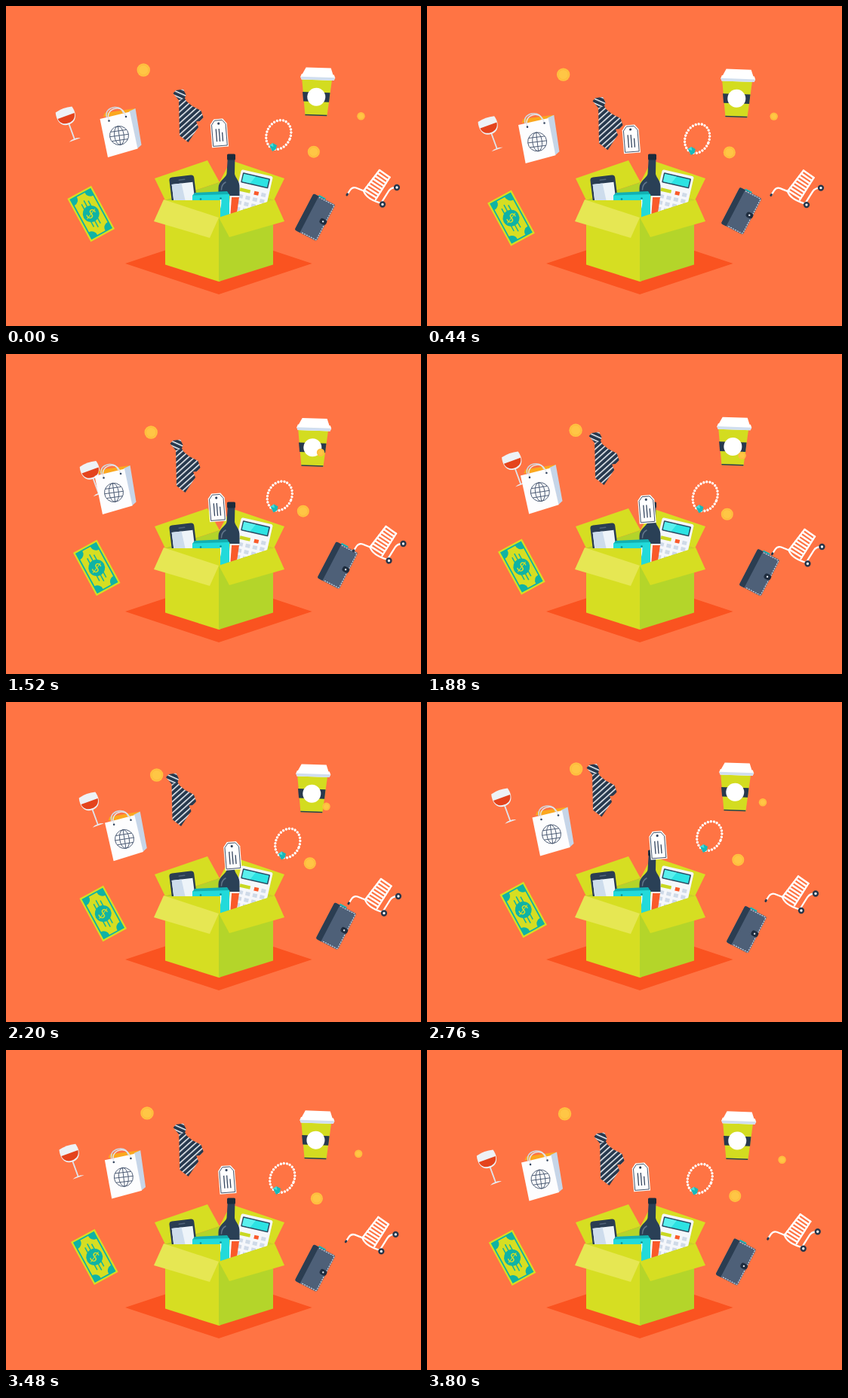
An HTML page that plays this animation: 550 px wide and 425 px high, repeating every 3.84 s.

```html
<!DOCTYPE html>
<html lang="en">
<head>
<meta charset="utf-8">
<title>Box of goods</title>
<style>
html, body { margin: 0; width: 100%; height: 100%; overflow: hidden; background: #ff7444; }
svg { display: block; width: 550px; height: 425px; }
</style>
</head>
<body>
<svg viewBox="0 0 550 425" xmlns="http://www.w3.org/2000/svg">
  <defs>
    <pattern id="stripes" width="5.6" height="5.6" patternUnits="userSpaceOnUse" patternTransform="rotate(-42)">
      <rect width="5.6" height="5.6" fill="#27394e"/>
      <rect width="5.6" height="1.5" fill="#f3f6fa"/>
    </pattern>
    <pattern id="knotStripes" href="#stripes" patternTransform="rotate(24)"/>
  </defs>

  <rect width="550" height="425" fill="#ff7444"/>
  <path d="M158 342L282 301 405.500 342 282 383Z" fill="#fa5320"/>

  <!-- back of the box -->
  <path d="M197 229L267 205 283 234 211 258Z" fill="#d6de22"/>
  <path d="M298 205L369 229 355 258 283 234Z" fill="#d6de22"/>
  <path d="M211 258L283 234V282Z" fill="#b3d42a"/>
  <path d="M283 234L355 258 283 282Z" fill="#c5da26"/>

  <!-- contents -->
  <g transform="translate(216 228) rotate(-7)">
    <rect width="33" height="56" rx="4" fill="#2a3d52"/>
    <rect x="2.5" y="9.5" width="28" height="42" fill="#eef4f9"/>
    <path d="M2.5 9.5h13l4 42H2.5Z" fill="#cddcec"/>
    <rect x="12" y="4" width="9" height="1.500" rx=".7" fill="#52647a"/>
  </g>
  <g transform="translate(312 217) rotate(13)">
    <rect width="43" height="62" rx="2.5" fill="#f5f7fb"/>
    <rect x="3" y="3.5" width="37" height="13.5" rx="1" fill="#2a4a60"/>
    <rect x="4.500" y="5" width="34" height="10.5" fill="#2ce3e3"/>
    <path d="M4.500 5h16l-5 10.500H4.500Z" fill="#5af0ee"/>
    <rect x="4" y="24" width="14" height="4.5" fill="#c9d822"/>
    <g id="keys"></g>
  </g>
  <path d="M297 252L309 252 305 282H294Z" fill="#f7f9fb"/>
  <path d="M299 254H309L305 282H297Z" fill="#fa5a2a"/>
  <g fill="#2a4056">
    <path d="M294 198H303.500L303 223C304 229 310 231 309.500 242V252H281.500V242C281.500 232 291 229 292.500 223Z"/>
    <rect x="293" y="196.500" width="11" height="8" rx="1.500" fill="#1b2b3c"/>
    <path d="M285.500 244Q285.500 237 291 234" fill="none" stroke="#61758a" stroke-width="1.500" stroke-linecap="round"/>
  </g>
  <path d="M250 248L293 246 297 252H247Z" fill="#12b0b2"/>
  <path d="M247 251.500L296 250V284H247Z" fill="#22dada"/>
  <path d="M258 258C257 270 263 277 272 278S285 269 284.500 257" fill="none" stroke="#f4fbfb" stroke-width="1.700"/>
  <circle cx="258" cy="256.500" r="1.300" fill="#0d8d92"/>
  <circle cx="284.500" cy="255.500" r="1.300" fill="#0d8d92"/>

  <!-- front of the box -->
  <path d="M211 258H284V365.500L282 366 211 343.500Z" fill="#d6de22"/>
  <path d="M282 281L354 258V343.500L282 366Z" fill="#b4d52a"/>
  <path d="M209 257L282 281 270 308 196 286Z" fill="#e6e753"/>
  <path d="M356 257L282 281 296 307 369 286Z" fill="#d6de22"/>

  <!-- floating goods, drawn where they stand at time zero -->
  <g id="glass"><g transform="translate(76.500 137.500) rotate(-20)">
    <path d="M0 19V42" stroke="#dfe5ec" stroke-width="1.800"/>
    <path d="M-8 43Q0 39.500 8 43Z" fill="#e9edf2"/>
    <path d="M-11.500 0Q0-3 11.500 0C14.500 11 11 21 0 21S-14.500 11-11.500 0Z" fill="#eef2f6"/>
    <path d="M-11.700 9H11.700C11 15 7 19 0 19S-11 15-11.700 9Z" fill="#e4441d"/>
  </g></g>

  <g id="bag">
    <path d="M129 147L131 142 171 136 168 146Z" fill="#fba81f"/>
    <path d="M163 140L171.500 136 179.500 184.500 174 189.500Z" fill="#c6d5e8"/>
    <path d="M124.500 150L164 140.500 174.500 189.500 135 201Z" fill="#fdfdfe"/>
    <path d="M133.500 148C131 139 138 135 144 134.500S154 137 155.500 142" fill="none" stroke="#cfd5de" stroke-width="1.600"/>
    <path d="M136.500 152C133 142 139 137 146 136S157 140 159 147" fill="none" stroke="#e3e6ec" stroke-width="1.500"/>
    <circle cx="136.500" cy="152.500" r="1.300" fill="#35465f"/>
    <circle cx="159" cy="147" r="1.300" fill="#35465f"/>
    <g transform="translate(150 172) rotate(-8)" fill="none" stroke="#46556f" stroke-width=".9">
      <circle r="12.500"/><ellipse rx="6.300" ry="12.500"/>
      <path d="M0-12.500V12.500M-12.500 0H12.500M-10.800-6.200H10.800M-10.800 6.200H10.800"/>
    </g>
  </g>

  <g id="bill"><g transform="translate(112.700 276) rotate(-28.500)">
    <rect x="-18" y="-32.500" width="36" height="65" fill="#d6de22"/>
    <rect x="-15.800" y="-30.300" width="31.600" height="60.600" fill="#0fb3a5"/>
    <path d="M-6-28.500H6A8 8 0 0 0 14-20V20A8 8 0 0 0 6 28.500H-6A8 8 0 0 0-14 20V-20A8 8 0 0 0-6-28.500Z" fill="#d6de22"/>
    <path d="M-5-17V17M0-20V20M5-17V17" stroke="#0fb3a5" stroke-width="1.500"/>
    <circle r="11" fill="#0fb3a5"/>
    <text transform="rotate(62)" y="6.300" text-anchor="middle" font-family="Lato, sans-serif" font-size="18" fill="#d6de22">$</text>
  </g></g>

  <g id="tie" fill="url(#stripes)">
    <path d="M236 124L247 133 258.500 139 261.500 148 257 153 247 154Z"/>
    <path d="M229 124L236.500 121.500 248 143 255 161 241.500 181 230 172Z"/>
    <path d="M221.500 116L225 112 235 110.500 238.500 118 237 122.500 229 125Z" fill="url(#knotStripes)"/>
  </g>

  <g id="tag"><g transform="translate(282.700 169) rotate(-4.500)">
    <path d="M-6-19H6L11-12.500V18.500H-11V-12.500Z" fill="#fff"/>
    <path d="M-5-17.200H5L9.300-11.700V16.700H-9.300V-11.700Z" fill="none" stroke="#35465f" stroke-width=".9"/>
    <circle cy="-13" r="1.600" fill="#35465f"/>
    <path d="M-4-6V11M0-6V11M4-1V11" stroke="#35465f" stroke-width="1.300"/>
  </g></g>

  <g id="beads">
    <ellipse rx="15.800" ry="20" transform="translate(361.300 171) rotate(24)" fill="none" stroke="#fff" stroke-width="3.400" stroke-linecap="round" stroke-dasharray="0 4.100"/>
    <path d="M349 185L353.500 182 359 185 357.500 190.500 353 193Z" fill="#16b9ba"/>
    <path d="M349 185L353.500 182 354.500 187Z" fill="#4fdcda"/>
  </g>

  <g id="cup"><g transform="translate(411.300 120.700) rotate(2)">
    <path d="M-20-24H20L15 25H-14Z" fill="#d3dc20"/>
    <path d="M-18.500-6H18L17 6.500H-17Z" fill="#27394e"/>
    <path d="M-14.200 23.500H15L14.800 25H-14Z" fill="#27394e"/>
    <path d="M-15-38.800H18L21.500-29H-20Z" fill="#fff"/>
    <path d="M-20.500-30H22.500L24-26 22.500-22.500H-20.500L-22-26Z" fill="#fff"/>
    <path d="M-22-26.200H24L22.500-22.500H-20.500Z" fill="#d0deef"/>
    <circle r="12" fill="#fff"/>
  </g></g>

  <g id="wallet"><g transform="translate(409.500 280.700) rotate(27.500)">
    <rect x="-9" y="-29" width="10" height="4" fill="#16b9ba"/>
    <rect x="-16.300" y="-27.200" width="32.600" height="54.400" rx="2.500" fill="#4e6078"/>
    <path d="M-14-27.200H-8.500V27.200H-14Q-16.300 27.200-16.300 25V-25Q-16.300-27.200-14-27.200Z" fill="#2b3d51"/>
    <path d="M-7.500-26H14Q15.400-26 15.400-24V24Q15.400 26 14 26H-7.500" fill="none" stroke="#d3dbe7" stroke-width="1.100" stroke-dasharray="2 1.300"/>
    <rect x="7.500" y="-3.700" width="9.500" height="7.400" rx="3" fill="#1f2d3f"/>
    <circle cx="12" r="1.200" fill="#e6ebf2"/>
  </g></g>

  <g id="cart" fill="none" stroke="#fff" stroke-width="2.300" stroke-linecap="round">
    <path d="M452.500 250L456 244.500Q459 240 464 241.500L474 245.500"/>
    <path d="M474 245.500L495 218M508.500 227.500L490 257"/>
    <path d="M474 245.500Q477 256 497 262L507 246Q510 241 517 241"/>
    <g id="ribs" stroke-width="2.500"></g>
    <path d="M451.800 251L452.500 249.800" stroke="#27364a" stroke-width="2.800"/>
    <g stroke="#27364a" stroke-width="2.500" fill="#fff"><circle cx="499" cy="263.500" r="2.900"/><circle cx="518" cy="241" r="2.900"/></g>
  </g>

  <g id="coinA"></g>
  <g id="coinB"></g>
  <g id="coinC"></g>
</svg>
<script>
const LOOP = 3840, STEP = 40;
const TIMES = [0, 920, 1520, 2200, 2760, 3160];
const $ = id => document.getElementById(id);

const coin = (id, x, y, r) => {
  $(id).innerHTML = `<circle cx="${x}" cy="${y}" r="${r}" fill="#ffc240"/>` +
    `<circle cx="${x}" cy="${y}" r="${r * 0.76}" fill="#ffc645" stroke="#fdb73c" stroke-width=".8"/>`;
};
coin('coinA', 182.2, 85, 8.7);
coin('coinB', 470.5, 146.3, 5.2);
coin('coinC', 407.8, 193.7, 8);

let ribs = '', keys = '';
for (let i = 0; i < 8; i++) {
  ribs += `M${495 - 2.9 * i} ${218 + 3.8 * i}L${508.5 - 2.5 * i} ${227.5 + 3.9 * i}`;
}
$('ribs').innerHTML = `<path d="${ribs}"/>`;
for (let row = 0; row < 4; row++) {
  for (let col = 0; col < 4; col++) {
    if (row === 0 && col < 2) continue;
    const hot = row === 0 && col === 2;
    keys += `<rect x="${4 + col * 9.7}" y="${24 + row * 8.5}" width="6" height="5" fill="${hot ? '#fa5a2a' : '#cfdae8'}"/>`;
  }
}
$('keys').innerHTML = keys;

// offsets from the resting place at each time
const items = [
  { id: 'glass', times: [0, 580, 920, 1520, 2200, 2760, 3160],
    x: [0, 5, 19, 32, 31, 19.5, 11.5], y: [0, 16, 22, 8.5, -14, -19, -15] },
  { id: 'bag', x: [0, -6, -7, 7, 15, 11], y: [0, 16, 12, 10, 3.5, -3],
    turn: [0, 2, 0, -1.2, 0, 2], pivot: '150 172' },
  { id: 'bill', x: [0, 1, 7.5, 16, 15, 9.5], y: [0, 11, 8, 5, 0, -1] },
  { id: 'tie', x: [0, -4.5, -4, -9.5, -10, -2], y: [0, 14, 3, -16, -28.5, -23.5] },
  { id: 'tag', x: [0, -18, -3, 17.5, 23.5, 18.5], y: [0, 22, 35, 35.5, 21.5, 10.5] },
  { id: 'beads', x: [0, -3.5, 1.5, 12, 13, 9.5], y: [0, 12, 17.5, 16.5, 7, 0.5] },
  { id: 'cup', x: [0, -3, -5, -6, -3, -2], y: [0, 4, 3.5, 1, -1, -1.5] },
  { id: 'wallet', x: [0, 18.5, 30, 28, 14, 4], y: [0, -11.5, 0, 17, 21.5, 16.5] },
  { id: 'cart', x: [0, 8, 8.5, 2, -3, -2.5], y: [0, 4.5, 11, 17, 13.5, 8.5] },
  { id: 'coinA', x: [0, 1, 10, 17.5, 15.5, 10], y: [0, 14, 19, 12, 4, 0] },
  { id: 'coinB', x: [0, -30.5, -53.5, -46, -25.5, -11.5], y: [0, -5, -15.5, -7.5, -13, -15] },
  { id: 'coinC', x: [0, -13.5, -14, -5, 4.5, 6], y: [0, 5.5, 15, 20.5, 16, 8.5] },
];
for (const item of items) item.node = $(item.id);

// smooth closed curve through the given values
function glide(times, vals, t) {
  const n = times.length;
  const time = k => times[(k + n) % n] + LOOP * Math.floor(k / n);
  const val = k => vals[(k + n) % n];
  const rate = k => (val(k + 1) - val(k)) / (time(k + 1) - time(k));
  const slope = k => {
    const a = time(k) - time(k - 1), b = time(k + 1) - time(k);
    return (rate(k - 1) * b + rate(k) * a) / (a + b);
  };
  let i = n - 1;
  while (times[i] > t) i--;
  const h = time(i + 1) - time(i), u = (t - time(i)) / h, v = 1 - u;
  return val(i) * v * v * (1 + 2 * u) + val(i + 1) * u * u * (3 - 2 * u) +
    h * u * v * (slope(i) * v - slope(i + 1) * u);
}

function draw(t) {
  for (const { node, times = TIMES, x, y, turn, pivot } of items) {
    let move = `translate(${glide(times, x, t).toFixed(2)} ${glide(times, y, t).toFixed(2)})`;
    if (turn) move += ` rotate(${glide(times, turn, t).toFixed(2)} ${pivot})`;
    node.setAttribute('transform', move);
  }
}

const start = performance.now();
function tick() {
  const t = (performance.now() - start) % LOOP;
  draw(Math.floor(t / STEP) * STEP);
  requestAnimationFrame(tick);
}
tick();
</script>
</body>
</html>
```
